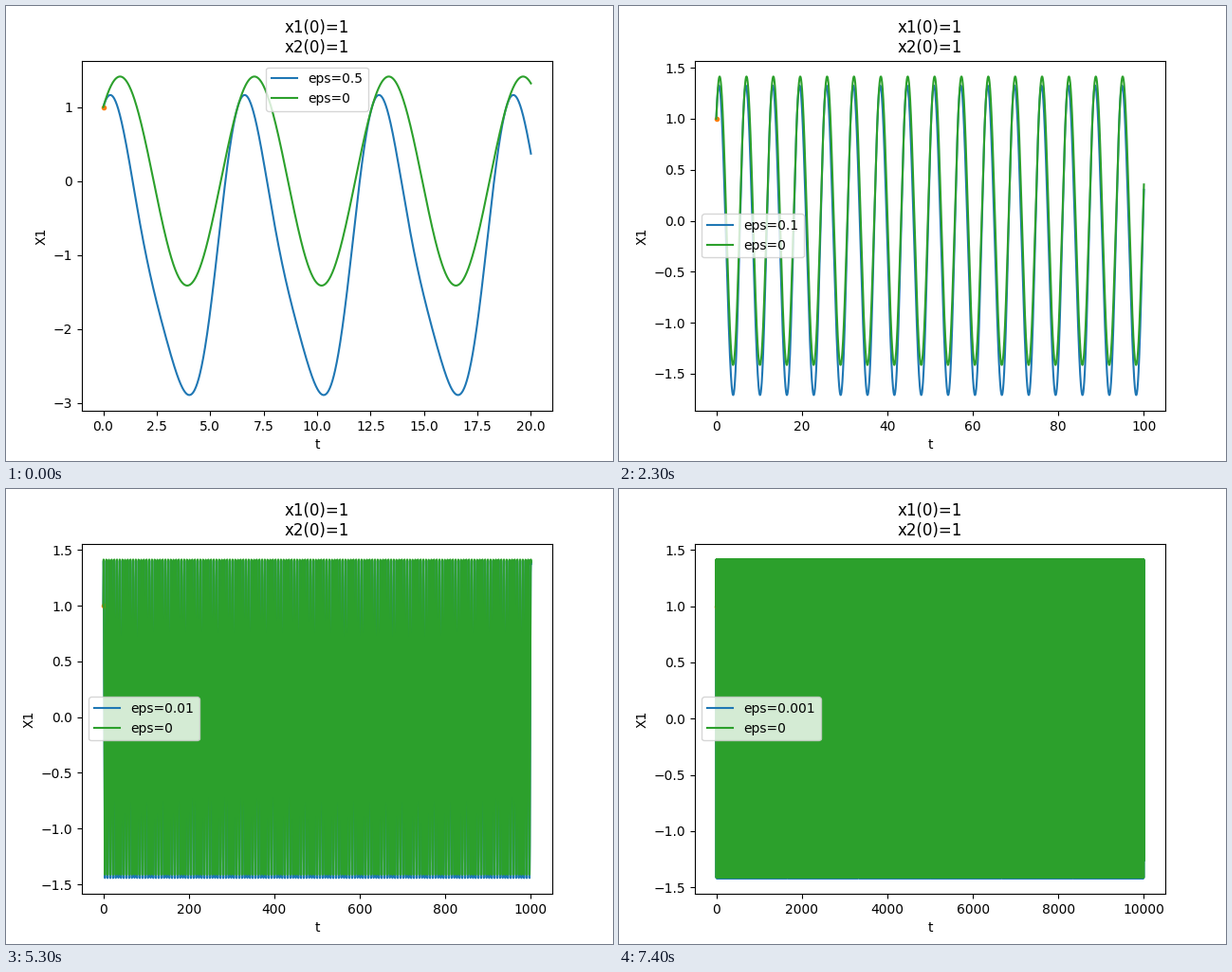
Recreate the animation shown at these times as a matplotlib script. Size 640x480 px, loop 8000 ms.

```python
import matplotlib.pyplot as plt
import numpy as np
from matplotlib.animation import FuncAnimation

plt.rcParams["agg.path.chunksize"] = 20000  # keeps the longest curve drawable

INTERVAL = 500

# (eps, time span, legend place, ticks of 500 ms on screen)
SCENES = [
    (0.5, 20, "upper center", 1),
    (0.1, 100, "center left", 6),
    (0.01, 1000, "center left", 6),
    (0.001, 10000, "center left", 3),
]
TIMELINE = [scene for scene in SCENES for _ in range(scene[3])]


def solution(t, eps):
    """First-order expansion of x'' + x = -eps (x + x')^2, x(0) = x'(0) = 1."""
    base = np.cos(t) + np.sin(t)
    correction = -2 + 2 / 3 * np.cos(2 * t) + 4 / 3 * np.cos(t)
    return base + eps * correction


fig, ax = plt.subplots(figsize=(6.4, 4.8), dpi=100)


def draw(frame):
    eps, span, place, _ = TIMELINE[frame]
    step = 0.02 if span <= 100 else 0.1
    t = np.linspace(0, span, round(span / step) + 1)

    ax.clear()
    ax.plot(t, solution(t, eps), color="C0", label=f"eps={eps}")
    ax.plot(0, 1, ".", color="C1")
    ax.plot(t, solution(t, 0), color="C2", label="eps=0")
    ax.set_title("x1(0)=1\nx2(0)=1")
    ax.set_xlabel("t")
    ax.set_ylabel("X1")
    ax.legend(loc=place)
    return ax.get_children()


anim = FuncAnimation(fig, draw, frames=len(TIMELINE), init_func=lambda: [],
                     interval=INTERVAL, repeat=True, repeat_delay=0)
plt.show()
```
